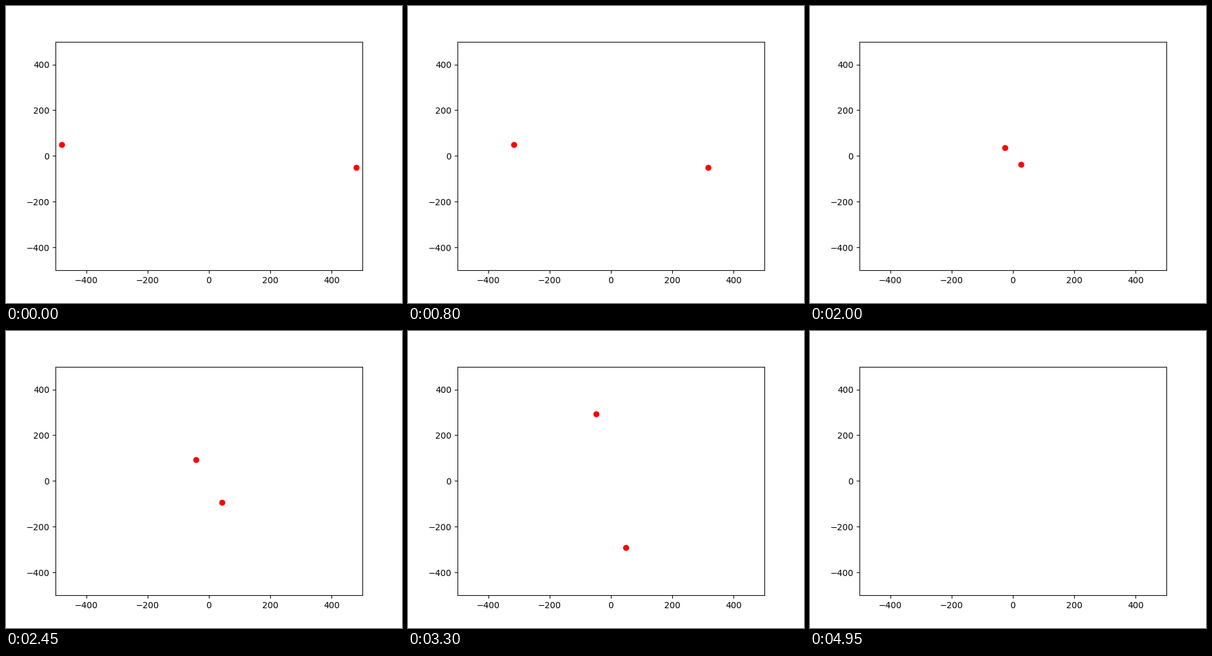
A matplotlib script for the animation above (5000 ms loop, 640 by 480 pixels).

```python
import numpy as np
import matplotlib.pyplot as plt
from matplotlib.animation import FuncAnimation

FRAMES = 100
INTERVAL = 50
PULL = 20000.0      # gravitational parameter of the pair
LEAD_STEPS = 2      # steps already taken when the loop starts


def trajectory(steps):
    """Positions of one body; its partner is always the mirror image."""
    pos = np.array([-500.0, 50.0])
    vel = np.array([10.0, 0.0])
    path = [pos.copy()]
    for _ in range(steps):
        gap = 2 * pos
        vel = vel - PULL * gap / np.linalg.norm(gap) ** 3
        pos = pos + vel
        path.append(pos.copy())
    return np.array(path)


path = trajectory(FRAMES + LEAD_STEPS)[LEAD_STEPS:]

fig, ax = plt.subplots(figsize=(6.4, 4.8), dpi=100)
ax.set_xlim(-500, 500)
ax.set_ylim(-500, 500)
bodies, = ax.plot([], [], "ro")


def update(frame):
    x, y = path[frame]
    bodies.set_data([x, -x], [y, -y])
    return bodies,


anim = FuncAnimation(fig, update, frames=FRAMES, interval=INTERVAL,
                     repeat=True, repeat_delay=0)
plt.show()
```
